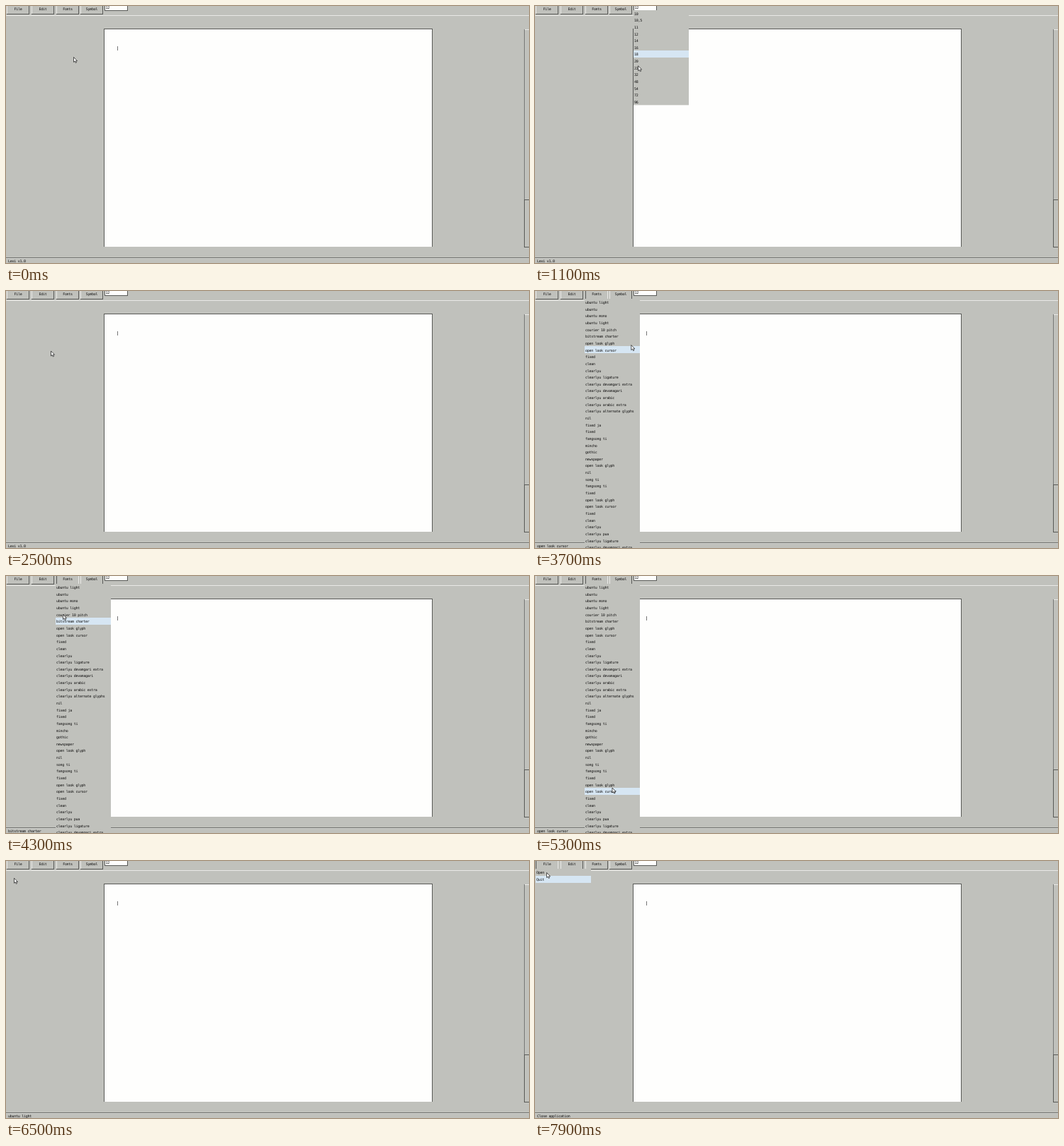
These frames come from a looping animation (738 by 364 pixels, 8 s). An HTML page:

```html
<!DOCTYPE html>
<html lang="en">
<head>
<meta charset="utf-8">
<title>Text editor menus</title>
<style>
html, body { margin: 0; width: 100%; height: 100%; overflow: hidden; background: #c0c1bc; }
svg { display: block; }
text {
  font: 5px "DejaVu Sans Mono", monospace; letter-spacing: -.27px;
  fill: #0c0c0c; white-space: pre; text-rendering: geometricPrecision;
}
rect { shape-rendering: crispEdges; }
.hidden { display: none; }
</style>
</head>
<body>
<svg id="stage" width="738" height="364" viewBox="0 0 738 364"></svg>
<script>
const STEP = 100, LOOP = 8000, ROW = 9.64, MENU_W = 78, CHAR_W = 2.74;
const FACE = '#c0c1bc', DARK = '#585956', LIGHT = '#e9e9e6', HOT = '#d6e6f3', PAPER = '#fefefd';
const stage = document.getElementById('stage');

function add(parent, tag, attrs) {
  const el = document.createElementNS('http://www.w3.org/2000/svg', tag);
  for (const k in attrs) el.setAttribute(k, attrs[k]);
  return parent.appendChild(el);
}
const box = (p, x, y, width, height, fill) => add(p, 'rect', { x, y, width, height, fill });
const paint = (el, fill) => el.setAttribute('fill', fill);

function label(p, x, y, str) {
  const el = add(p, 'text', { x, y });
  el.textContent = str;
  return el;
}

function makeButton(name, i) {
  const x = Math.round(1 + i * 34.8);
  const left = box(stage, x, 0, 1, 12, LIGHT);
  const right = box(stage, x + 31, 0, 1, 12, DARK);
  box(stage, x, 11, 32, 1, DARK);
  label(stage, x + 16 - name.length * CHAR_W / 2, 6, name);
  return { left, right };
}

function makeMenu(x, top, names, props) {
  const group = add(stage, 'g', { class: 'hidden' });
  const rows = names.map((name, i) => {
    const y = top + i * ROW, end = Math.floor(y + ROW);
    const back = box(group, x, Math.floor(y), MENU_W, end - Math.floor(y), FACE);
    const line = box(group, x, end, MENU_W, 1, LIGHT);
    label(group, x + 1, y + 6.6, name);
    return { back, line };
  });
  return { group, top, rows, ...props };
}

// Scene
box(stage, 0, 13, 738, 1, LIGHT);
const [fileButton, , fontButton] = ['File', 'Edit', 'Fonts', 'Symbol'].map(makeButton);
box(stage, 139, 0, 33, 7, DARK);
box(stage, 140, 0, 31, 6, PAPER);
label(stage, 140.6, 4, '12');
box(stage, 138, 32, 464, 309, DARK);
box(stage, 139, 33, 462, 308, PAPER);
box(stage, 157, 57, 1, 6, '#777');
box(stage, 731, 33, 7, 1, LIGHT);
box(stage, 731, 33, 1, 309, '#777875');
box(stage, 731, 274, 7, 68, DARK);
box(stage, 732, 275, 6, 66, FACE);
box(stage, 0, 356, 738, 1, '#70716e');
box(stage, 0, 357, 738, 1, '#d0d1cd');
const status = label(stage, 3, 362.6, '');

const sizes = '10|10,5|11|12|14|16|18|20|22|32|48|54|72|96'.split('|');
const fonts = ('ubuntu light|ubuntu|ubuntu mono|ubuntu light|courier 10 pitch|bitstream charter|' +
  'open look glyph|open look cursor|fixed|clean|clearlyu|clearlyu ligature|clearlyu devangari extra|' +
  'clearlyu devanagari|clearlyu arabic|clearlyu arabic extra|clearlyu alternate glyphs|nil|fixed ja|' +
  'fixed|fangsong ti|mincho|gothic|newspaper|open look glyph|nil|song ti|fangsong ti|fixed|' +
  'open look glyph|open look cursor|fixed|clean|clearlyu|clearlyu pua|clearlyu ligature|' +
  'clearlyu devangari extra').split('|');
const menus = [
  makeMenu(139, 6, sizes, { open: 900, close: 2100, offset: -14, trail: true }),
  makeMenu(70, 11.5, fonts, { open: 3200, close: 6400, offset: 6, hints: fonts, button: fontButton }),
  makeMenu(1, 11.5, ['Open', 'Quit'], {
    open: 7400, close: LOOP, offset: 6, hints: ['Open document', 'Close application'], button: fileButton
  })
];

const pointer = add(stage, 'path', {
  d: 'M0 0V7L1.6 5.6 2.8 8 4 7.5 2.9 5.2H5Z', fill: '#fff', stroke: '#111', 'stroke-width': .7
});

// Each move runs from where the last one ended; bows bend it sideways or down
const moves = [], home = { x: 95.5, y: 72.5 };
function move(from, to, x, y, bowX = 0, bowY = 0) {
  const start = moves.length ? moves[moves.length - 1].end : home;
  moves.push({ from, to, start, end: { x, y }, bowX, bowY });
}

move(200, 300, 138, 9);             // to the size box
move(500, 700, 142, 1);
move(900, 1800, 154, 24, 0, 95);    // down the sizes and back
move(1900, 2500, 63.5, 85);
move(2700, 3000, 76, 2);            // to Fonts
move(3200, 4000, 80, 10, 66, 80);   // dip into the list and back
move(4100, 4300, 80.5, 54.5);
move(4400, 5100, 109, 300, 50);     // down the list
move(5800, 6300, 76, 6, 50);        // and up again
move(6400, 6500, 11.5, 24.3);
move(6800, 7000, 12, 1.5);          // to File
move(7600, 7900, 16.5, 16.5);

function pointerAt(t) {
  const m = moves.filter(({ from }) => from <= t).pop();
  if (!m) return home;
  const k = Math.min(1, (t - m.from + STEP) / (m.to - m.from + STEP));
  const bend = Math.sin(Math.PI * k);
  return {
    x: m.start.x + (m.end.x - m.start.x) * k + m.bowX * bend,
    y: m.start.y + (m.end.y - m.start.y) * k + m.bowY * bend
  };
}

function hotRow({ offset, top, rows }, t) {
  const i = Math.floor((pointerAt(t).y + offset - top) / ROW);
  return Math.min(i, rows.length - 1);
}

function drawMenu(menu, t) {
  const { group, button, rows, open, close, trail } = menu;
  const shown = t >= open && t < close;
  group.classList.toggle('hidden', !shown);
  if (button) {
    paint(button.left, shown ? DARK : LIGHT);
    paint(button.right, shown ? LIGHT : DARK);
  }
  if (!shown) return;
  const hot = hotRow(menu, t);
  let deepest = -1;
  if (trail)
    for (let s = open; s <= t; s += STEP) deepest = Math.max(deepest, hotRow(menu, s));
  rows.forEach(({ back, line }, i) => {
    paint(back, i === hot ? HOT : FACE);
    paint(line, i === hot ? HOT : i > 0 && i <= deepest ? DARK : LIGHT);
  });
}

// The hint of the last hot row stays after its menu closes
function statusAt(t) {
  let text = 'Lexi v1.0';
  for (const menu of menus) {
    if (!menu.hints || t < menu.open) continue;
    text = menu.hints[hotRow(menu, Math.min(t, menu.close - STEP))] || text;
  }
  return text;
}

let last = -1;
function frame() {
  const t = Math.floor(performance.now() % LOOP / STEP) * STEP;
  if (t !== last) {
    last = t;
    const { x, y } = pointerAt(t);
    pointer.setAttribute('transform', `translate(${x} ${y})`);
    menus.forEach(menu => drawMenu(menu, t));
    status.textContent = statusAt(t);
  }
  requestAnimationFrame(frame);
}
frame();
</script>
</body>
</html>
```
